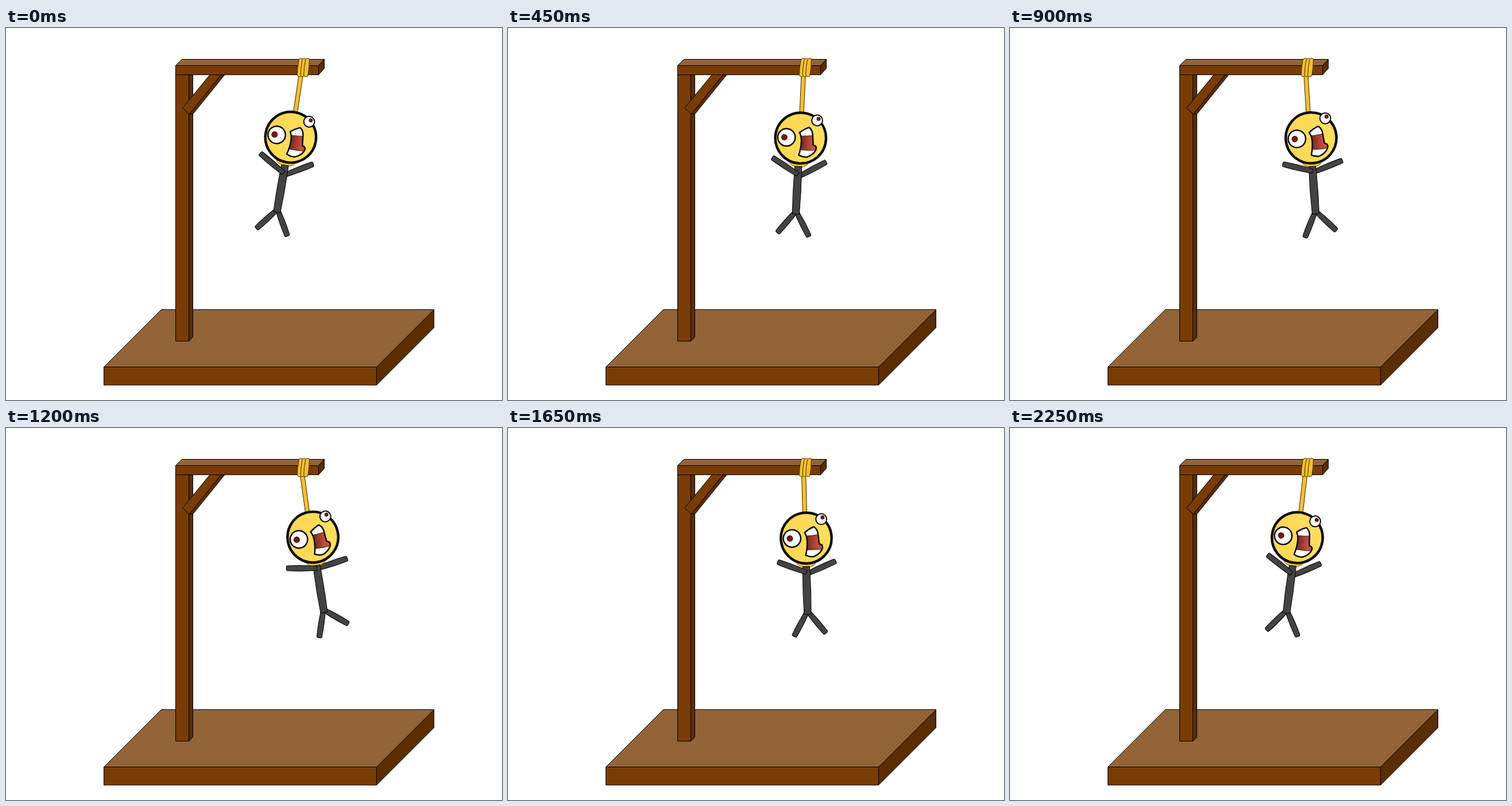
Write an HTML page that moves like this. It is 864 px wide and 648 px high and loops after 2400 ms.

```html
<!DOCTYPE html>
<html lang="en">
<head>
<meta charset="utf-8">
<title>Swing</title>
<style>
  html, body { margin: 0; width: 100%; height: 100%; overflow: hidden; background: #fff; }
  svg { display: block; width: 864px; height: 648px; }
  .line { stroke: #000; stroke-width: 1; stroke-linejoin: round; }
  .top { fill: #936437; }
  .front { fill: #783c04; }
  .side { fill: #5a2d03; }
  .cloth { fill: #434343; }
  .rope { fill: #f4c02e; stroke: #3d2a00; }
  .ink { stroke: #0a0a0a; stroke-width: 2.5; stroke-linejoin: round; }
</style>
</head>
<body>
<svg viewBox="0 0 864 648">
  <defs>
    <linearGradient id="skin">
      <stop offset="0" stop-color="#fdd653"/>
      <stop offset="1" stop-color="#ffdf5e"/>
    </linearGradient>
    <linearGradient id="throat">
      <stop offset="0.1" stop-color="#74281c"/>
      <stop offset="0.75" stop-color="#c8503f"/>
    </linearGradient>
    <path id="mouth" d="M-2.5-9.4Q5-16 13.5-19.3Q19-16 20.5-8Q21.5 2 22.5 11Q28.5 12 28 17Q27.5 21 24 25Q18 31 12 32.7Q5 33.2-1.8 29.8Q2 17 1.4 4Q1-4-2.5-9.4Z"/>
    <clipPath id="lips"><use href="#mouth"/></clipPath>
  </defs>

  <g class="line">
    <path class="top" d="M270.5 490.5H745.5L645.5 590.5H170.5Z"/>
    <path class="front" d="M170.5 590.5H645.5V622H170.5Z"/>
    <path class="side" d="M645.5 590.5L745.5 490.5V522L645.5 622Z"/>
    <path class="side" d="M318.5 81.5H325.5V538.5L318.5 545.5Z"/>
    <path class="front" d="M295.5 81.5H318.5V545.5H295.5Z"/>
    <path class="side" d="M319.5 150L326 149.5L381 81.5H374Z"/>
    <path class="front" d="M307.5 139.5L355 81.5H374.5L319.5 150Z"/>
    <path class="top" d="M295.5 65.5L306.5 54.5H554.5L544.5 65.5Z"/>
    <path class="front" d="M295.5 65.5H544.5V81.5H295.5Z"/>
    <path class="side" d="M544.5 65.5L554.5 54.5V70.5L544.5 81.5Z"/>
  </g>

  <g id="body">
    <g class="line cloth">
      <path id="leftLeg"/>
      <path id="rightLeg"/>
      <path id="rightArm"/>
    </g>
    <ellipse class="rope" cx=".5" cy="157" rx="18" ry="12" stroke-width=".7"/>
    <path class="line cloth" d="M-6 167.5H6Q7.6 209 6 250.5H-6Q-7.6 209-6 167.5Z"/>
    <path id="leftArm" class="line cloth"/>
  </g>

  <path id="cord" class="rope" d="M-3.6 4H3.6V80H-3.6Z"/>

  <g id="head">
    <g transform="translate(1.5 117.8)">
      <circle r="44.2" fill="url(#skin)" stroke="#0a0a0a" stroke-width="4.4"/>
      <g class="ink" fill="#fff">
        <circle cx="-24.7" r="15.2"/>
        <circle cx="27.1" cy="-32.2" r="9.4" stroke-width="2"/>
      </g>
      <g fill="#74180e" stroke="#4a1a14">
        <circle cx="-28.5" r="5"/>
        <circle cx="29.5" cy="-35" r="3"/>
      </g>
      <use href="#mouth" fill="url(#throat)"/>
      <g clip-path="url(#lips)" fill="#fff" stroke="#2a0d08" stroke-width=".8">
        <path d="M-6-24H26V-6.2Q12-4-2-3.4Z"/>
        <path d="M-6 20Q12 21.5 25 20L32 38H-6Z"/>
      </g>
      <use href="#mouth" class="ink" fill="none"/>
    </g>
  </g>

  <g class="rope">
    <path id="coil" d="M510.3 55Q513.5 51 517 54Q517 70 514.3 83.5Q510.5 86.5 507.2 82.5Q507.6 68 510.3 55Z"/>
    <use href="#coil" x="5.8"/>
    <use href="#coil" x="11.4"/>
  </g>
</svg>
<script>
  const STEP = 150, HALF = 8, HOLD = 3;
  const byId = id => document.getElementById(id);
  const mix = ([a, b], p) => a + (b - a) * p;

  // joint height and angle each run from a held pose to an end pose
  const limbs = [
    { id: 'leftLeg', size: 48.5, x: -0.7, y: [246.5, 246.5], angle: [128, 107.5] },
    { id: 'rightLeg', size: 48.5, x: 1, y: [246.5, 246.5], angle: [60, 38.7] },
    { id: 'rightArm', size: 52.5, x: 3.2, y: [184, 172.5], angle: [-31, -9.5] },
    { id: 'leftArm', size: 53.5, x: 0, y: [181.3, 172.4], angle: [210.5, 189] }
  ];

  for (const { id, size: n } of limbs) {
    byId(id).setAttribute('d', `M0-3.7Q${n / 2}-5.6 ${n - 2}-4.4Q${n}-4.2 ${n}-2V2Q${n} 4.2 ${n - 2} 4.4Q${n / 2} 5.6 0 3.7Z`);
  }

  function place(id, x, y, angle) {
    byId(id).setAttribute('transform', `translate(${x} ${y}) rotate(${angle})`);
  }

  function draw(step) {
    const swing = 9.8 - step * (2.2 + 0.02 * step);
    const reach = Math.max(0, (step - HOLD) / (HALF - HOLD));
    place('body', 514.5, 74, swing);
    place('head', 514.5, 74, swing);
    place('cord', 515, 74, swing * 0.87);
    for (const { id, x, y, angle } of limbs) place(id, x, mix(y, reach), mix(angle, reach));
  }

  function frame() {
    const step = Math.floor(performance.now() / STEP) % (2 * HALF);
    draw(Math.min(step, 2 * HALF - step));
    requestAnimationFrame(frame);
  }
  frame();
</script>
</body>
</html>
```
